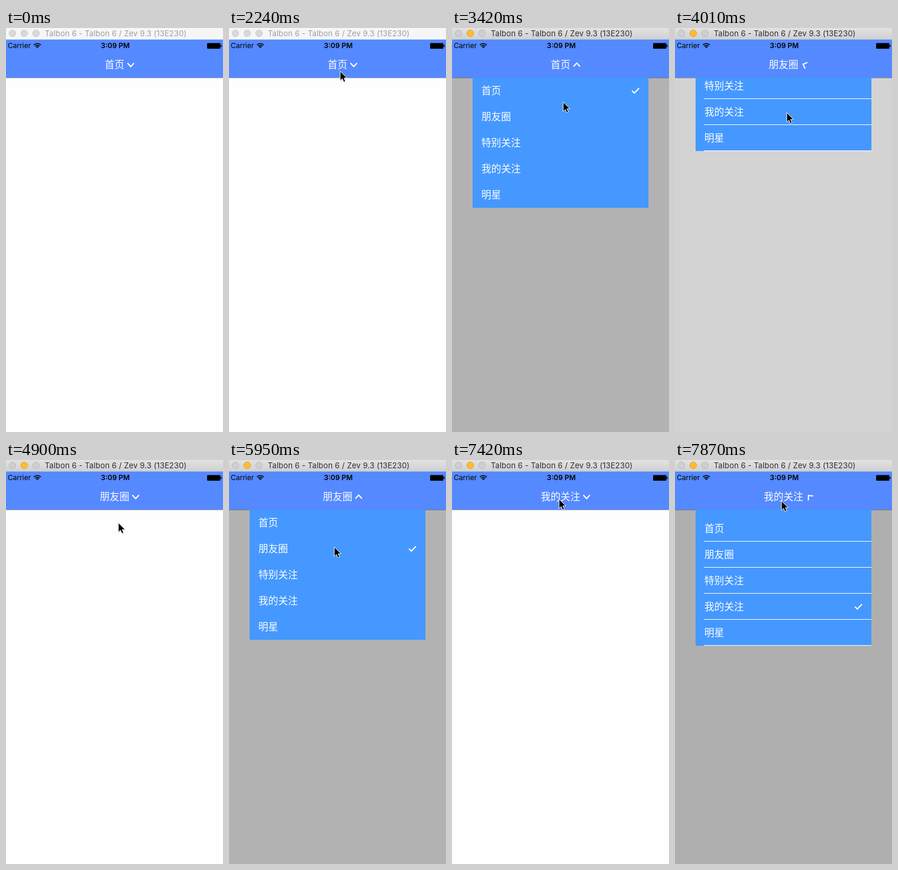
These frames come from a looping animation (369x683 px, 8 s). An HTML page:

```html
<!DOCTYPE html>
<html lang="zh">
<head>
<meta charset="utf-8">
<title>Dropdown menu</title>
<style>
  html, body { margin: 0; width: 100%; height: 100%; overflow: hidden; background: #fefefe; }
  svg { display: block; width: 369px; height: 683px; }
  text { font-family: Inter, Roboto, sans-serif; }
  .cjk { font: 16.75px "Noto Sans CJK SC", "Noto Sans CJK", sans-serif; fill: #fff; }
  .line { fill: none; stroke: #fff; stroke-width: 2; }
  #bar { fill: #f6f6f6; }
  #bar + text { fill: #9e9e9e; font-size: 13px; letter-spacing: .15px; }
  .dot { fill: #d9d9d9; stroke: #c8c8c8; }
  .active #bar { fill: url(#chrome); }
  .active #bar + text { fill: #2e2e2e; }
  .active .dot { fill: #cfcfcf; stroke: #b9b9b9; }
  .active .dot.min { fill: #febd2f; stroke: #dfa023; }
</style>
</head>
<body>
<svg id="stage" viewBox="0 0 369 683">
  <defs>
    <linearGradient id="chrome" x2="0" y2="1">
      <stop stop-color="#e2e2e2"/><stop offset="1" stop-color="#d0d0d0"/>
    </linearGradient>
    <clipPath id="below"><rect y="84" width="369" height="599"/></clipPath>
  </defs>

  <rect width="369" height="683" fill="#fefefe"/>
  <rect id="mask" y="84" width="369" height="599" opacity="0"/>
  <rect y="84" width="369" height="1" fill="#000" opacity=".3"/>

  <g clip-path="url(#below)">
    <g id="menu">
      <rect x="35" y="-216" width="299" height="520" fill="#4598ff"/>
      <g id="rows"></g>
      <g id="rules" fill="#fff"></g>
      <path id="check" class="line" stroke-width="2.3" d="M306 106l4 4 8-8.3"/>
    </g>
  </g>

  <rect y="19" width="369" height="65" fill="#5589ff"/>
  <text x="3" y="34.4" font-size="12">Carrier</text>
  <g fill="none" stroke="#000" stroke-width="1.7">
    <path d="M47.5 28.6a8.3 8.3 0 0 1 11.6 0M49.6 31a5.2 5.2 0 0 1 7.4 0"/>
    <path d="M53.3 34.3l-2-2.1a2.9 2.9 0 0 1 4 0z" fill="#000" stroke="none"/>
  </g>
  <text x="185.8" y="34.4" font-size="12" font-weight="600" text-anchor="middle">3:09 PM</text>
  <rect x="342" y="25.5" width="22.5" height="9.5" rx="1.2"/>
  <rect x="365" y="28.3" width="1.6" height="4" rx=".8"/>
  <text id="head" class="cjk" y="68" text-anchor="middle" x="184.6"></text>
  <path id="arrow" class="line" d="M-5.6-3L0 3 5.6-3"/>

  <rect id="bar" width="369" height="19.5"/>
  <text x="66" y="14">Talbon 6 - Talbon 6 / Zev 9.3 (13E230)</text>
  <circle class="dot" cx="11" cy="9" r="5.6"/>
  <circle class="dot min" cx="31" cy="9" r="5.6"/>
  <circle class="dot" cx="51" cy="9" r="5.6"/>

  <g id="cursor">
    <path d="M0 0v16.2l3.7-3.5 2.4 5.6 2.9-1.2-2.4-5.4h5.1z" transform="translate(.5 1.5)" opacity=".2"/>
    <path d="M0 0v16.2l3.7-3.5 2.4 5.6 2.9-1.2-2.4-5.4h5.1z" stroke="#fff"/>
  </g>
</svg>

<script>
const LOOP = 8000, ROW = 44, HEIGHT = 5 * ROW;
const FIRST = 1343, STEP = 148.2;
const ACTIVATE = 2500;
const items = ['首页', '朋友圈', '特别关注', '我的关注', '明星'];

// Each visit to the menu: when it opens and closes, and which row is picked
const visits = [
  { open: 2600, close: 3800, pick: 1 },
  { open: 5200, close: 6500, pick: 3 },
  { open: 7570, close: Infinity, pick: 3 }
];

// Pointer: time, x, y
const path = [
  [1343, 339, 621], [1936, 188, 89], [2090, 188, 89], [2232, 189, 73],
  [2980, 189, 73], [3418, 189, 125], [3710, 190, 143], [4160, 190, 143],
  [4307, 190, 140], [4752, 190, 140], [4900, 191, 106], [5050, 187, 70],
  [5490, 186, 70], [5937, 179, 147], [6380, 163, 224], [6975, 163, 224],
  [7419, 182, 66], [7567, 182, 66], [7716, 181, 69]
];

const $ = id => document.getElementById(id);
const clamp = v => Math.min(1, Math.max(0, v));
const smooth = p => p * p * (3 - 2 * p);

function spring(ms) {
  if (ms <= 0) return 0;
  if (ms > 650) return 1;
  const damp = .7, w = .015, root = Math.sqrt(1 - damp * damp), a = w * root * ms;
  return 1 - Math.exp(-damp * w * ms) * (Math.cos(a) + damp / root * Math.sin(a));
}

function pointer(t) {
  let i = 0;
  while (i < path.length - 2 && t >= path[i + 1][0]) i++;
  const [a, b] = [path[i], path[i + 1]];
  const p = smooth(clamp((t - a[0]) / (b[0] - a[0])));
  return [a[1] + (b[1] - a[1]) * p, a[2] + (b[2] - a[2]) * p];
}

function draw(t) {
  let shown = 0, turn = 0, picked = 0;
  for (const v of visits) {
    if (t < v.open) break;
    shown = spring(t - v.open) * (1 - smooth(clamp((t - v.close) / 460)));
    turn = smooth(clamp((t - v.open + 50) / 500)) - smooth(clamp((t - v.close) / 500));
    if (t >= v.close) picked = v.pick;
    else if (v.close === Infinity) picked = v.pick;
  }

  const shift = Math.round((shown - 1) * HEIGHT);
  $('menu').setAttribute('transform', `translate(0 ${shift})`);
  $('menu').style.display = shown > 0 ? '' : 'none';
  $('rules').style.display = shift ? '' : 'none';
  $('mask').setAttribute('opacity', .3 * shown);
  $('check').setAttribute('transform', `translate(0 ${picked * ROW})`);

  const name = items[picked];
  if ($('head').textContent !== name) $('head').textContent = name;
  const ax = 195.4 + name.length * 8.375;
  $('arrow').setAttribute('transform', `translate(${ax} 62.3) rotate(${turn * 180})`);

  $('stage').classList.toggle('active', t >= ACTIVATE);
  $('cursor').style.display = t < FIRST ? 'none' : '';
  $('cursor').setAttribute('transform', `translate(${pointer(t)})`);
}

$('rows').innerHTML = items.map((s, i) =>
  `<text class="cjk" x="50" y="${111.8 + i * ROW}">${s}</text>`).join('');
$('rules').innerHTML = items.map((s, i) =>
  `<rect x="49" y="${127 + i * ROW}" width="285" height="1"/>`).join('');

function tick() {
  const t = performance.now() % LOOP;
  draw(t < FIRST ? 0 : FIRST + Math.floor((t - FIRST) / STEP) * STEP);
  requestAnimationFrame(tick);
}
tick();
</script>
</body>
</html>
```
